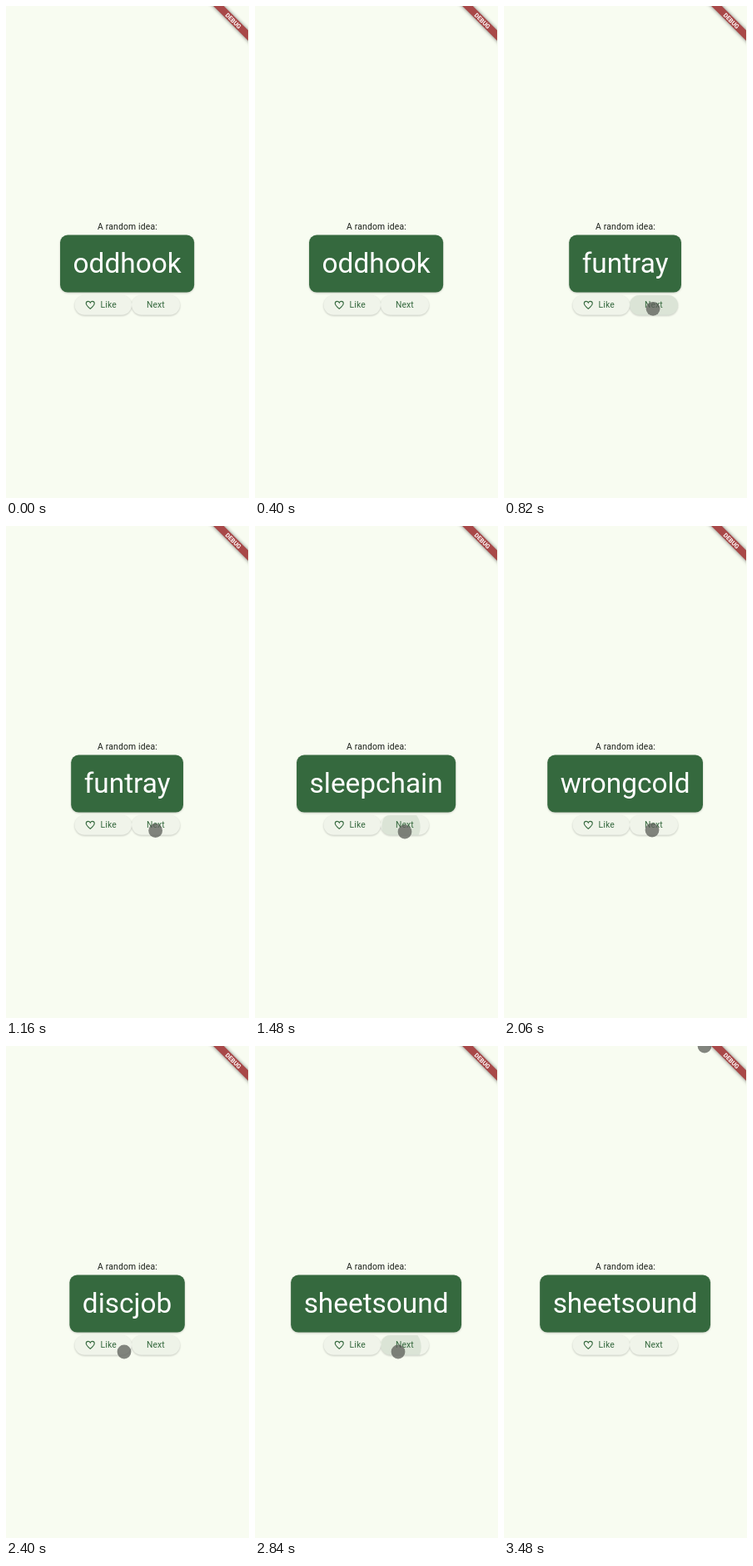
Animation, 292 px wide and 592 px high, one loop 4480 ms. Source, as an HTML page:

```html
<!DOCTYPE html>
<html lang="en">
<head>
<meta charset="utf-8">
<title>Random idea</title>
<style>
  html, body { margin: 0; width: 100%; height: 100%; overflow: hidden; background: #f8fcf1; }
  svg { display: block; width: 292px; height: 592px; font-family: Roboto, sans-serif; }
  .idea { font-size: 33.4px; fill: #fff; text-anchor: middle; }
  .label { font-size: 10.36px; letter-spacing: .185px; fill: #191d18; text-anchor: middle; }
  .action { font-size: 10.36px; letter-spacing: .15px; fill: #35693e; }
  .banner { font-size: 7.3px; font-weight: 700; fill: #fff; text-anchor: middle; }
</style>
</head>
<body>
<svg viewBox="0 0 292 592">
  <defs>
    <filter id="soft" x="-30%" y="-80%" width="160%" height="260%"><feGaussianBlur stdDeviation="1"/></filter>
    <filter id="bannerShadow" x="-20%" y="-150%" width="140%" height="400%"><feGaussianBlur stdDeviation="2"/></filter>
    <clipPath id="screen"><rect width="291" height="592"/></clipPath>
    <clipPath id="nextShape"><rect x="151" y="348" width="58" height="23.7" rx="11.85"/></clipPath>
    <g id="buttons">
      <rect x="82.5" y="348" width="68.5" height="23.7" rx="11.85"/>
      <rect x="151" y="348" width="58" height="23.7" rx="11.85"/>
    </g>
  </defs>
  <rect width="292" height="592" fill="#f8fcf1"/>
  <text class="label" x="146" y="269.1">A random idea:</text>

  <rect id="cardShadow" y="276.4" height="69" rx="9" opacity=".2" filter="url(#soft)"/>
  <rect id="card" y="275.6" height="69" rx="9" fill="#35693e"/>
  <text id="idea" class="idea" x="145.6" y="321.1"></text>

  <use href="#buttons" y="1" opacity=".2" filter="url(#soft)"/>
  <use href="#buttons" fill="#f0f4ea"/>
  <g clip-path="url(#nextShape)"><circle id="ripple" cx="175.5" cy="362" fill="#35693e"/></g>
  <path transform="translate(94.6 353.2) scale(.555)" fill="none" stroke="#35693e" stroke-width="2"
    d="M12 20C6.5 15.2 3 12 3 8.5 3 6 5 4 7.5 4 9.3 4 11.2 5.2 12 7 12.8 5.2 14.7 4 16.5 4 19 4 21 6 21 8.5 21 12 17.5 15.2 12 20Z"/>
  <text class="action" x="113.5" y="363.3">Like</text>
  <text class="action" x="168.9" y="363.3">Next</text>

  <g clip-path="url(#screen)">
    <g transform="translate(291 0) rotate(45)">
      <rect x="-40" y="20.7" width="80" height="8.9" opacity=".5" filter="url(#bannerShadow)"/>
      <rect x="-40" y="20.7" width="80" height="8.9" fill="#a84848"/>
      <text class="banner" y="27.8">DEBUG</text>
    </g>
  </g>
  <circle id="pointer" r="8.4" fill="#5c5f5a" opacity=".76"/>
</svg>
<script>
const LOOP = 4480;
const STEP = 580 / 7;      // refresh interval of the screen
const PHASE = 1480;        // a moment the refresh is aligned to
const PRESS_LEAD = 80;     // a press comes this long before its word
const RIPPLE_HOLD = 140;
const RIPPLE_FADE = 120;
const CARD_PADDING = 15.5;
const CENTER = 145.6;

const ideas = [
  { word: 'oddhook', at: -1000 },
  { word: 'funtray', at: 690 },
  { word: 'sleepchain', at: 1480 },
  { word: 'wrongcold', at: 1920 },
  { word: 'discjob', at: 2140 },
  { word: 'sheetsound', at: 2800 }
];
// Where the pointer passes; it eases between these
const stops = [
  { at: 300, x: 262, y: -12 },
  { at: 680, x: 179, y: 364 },
  { at: 1480, x: 180, y: 368 },
  { at: 2060, x: 178, y: 366 },
  { at: 2390, x: 142, y: 368 },
  { at: 2740, x: 172, y: 368 },
  { at: 2980, x: 172, y: 368 },
  { at: 3460, x: 241, y: 0 }
];

const byId = id => document.getElementById(id);
const set = (id, attrs) => {
  for (const key in attrs) byId(id).setAttribute(key, attrs[key]);
};
const clamp = v => Math.max(0, Math.min(1, v));
const smooth = v => v * v * (3 - 2 * v);
const mix = (a, b, k) => a + (b - a) * k;
const latest = (list, t) => list.filter(item => item.at <= t).pop();

function drawCard(t) {
  const label = byId('idea');
  label.textContent = latest(ideas, t).word;
  const width = label.getComputedTextLength() + 2 * CARD_PADDING;
  const box = { x: CENTER - width / 2, width };
  set('card', box);
  set('cardShadow', box);
}

function drawRipple(t) {
  const { at } = latest(ideas, t + PRESS_LEAD);
  const age = t - at + PRESS_LEAD;
  const fadeIn = clamp(age / 60);
  const fadeOut = clamp((at + RIPPLE_HOLD + RIPPLE_FADE - t) / RIPPLE_FADE);
  set('ripple', { r: 8 + age * .19, opacity: .115 * fadeIn * fadeOut });
}

function drawPointer(t) {
  const from = latest(stops, t);
  set('pointer', { visibility: from ? 'visible' : 'hidden' });
  if (!from) return;
  const to = stops[stops.indexOf(from) + 1] || from;
  const k = smooth(clamp((t - from.at) / (to.at - from.at || 1)));
  set('pointer', { cx: mix(from.x, to.x, k), cy: mix(from.y, to.y, k) });
}

function draw(time) {
  const t = PHASE + Math.floor((time - PHASE) / STEP + 1e-6) * STEP;
  drawCard(t);
  drawRipple(t);
  drawPointer(t);
}

const start = performance.now();
function tick() {
  draw((performance.now() - start) % LOOP);
  requestAnimationFrame(tick);
}
tick();
</script>
</body>
</html>
```
